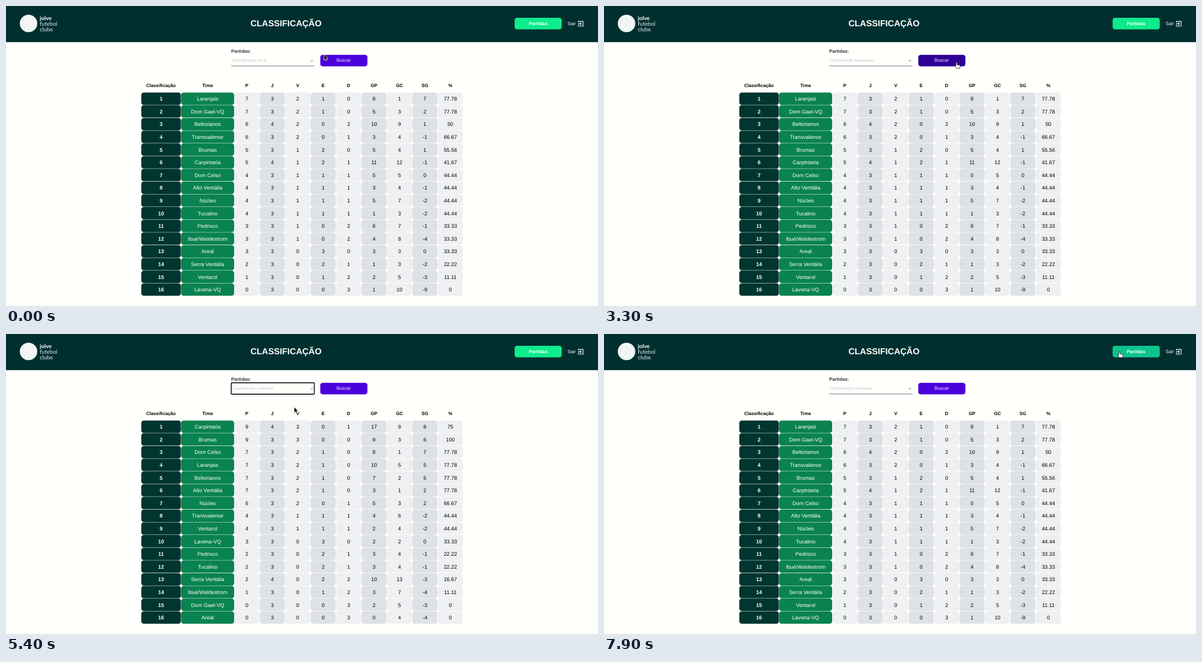
Write an HTML page that moves like this. It is 1051 px wide and 533 px high and loops after 8 s.

```html
<!DOCTYPE html>
<html lang="pt-BR">
<head>
<meta charset="utf-8">
<title>Classificação</title>
<style>
  html, body { margin: 0; width: 100%; height: 100%; overflow: hidden; background: #fffffc; }
  svg { display: block; width: 1051px; height: 533px; font-family: "Liberation Sans", Arial, sans-serif; font-size: 8.2px; text-rendering: geometricPrecision; }
  .mid { text-anchor: middle; }
  .bold { font-weight: bold; }
  .cell { font-size: 9.4px; text-anchor: middle; }
  .brand { font-family: Lato, sans-serif; font-size: 9.9px; }
  #popup { font-size: 7.4px; }
  #popup > rect:first-child { filter: drop-shadow(0 1.5px 1.5px #0005); }
</style>
</head>
<body>
<svg viewBox="0 0 1051 533">
  <rect width="1051" height="533" fill="#fffffc"/>
  <rect width="1051" height="64.2" fill="#012f30"/>
  <circle cx="40" cy="31" r="15.5" fill="#f1f5f5"/>
  <g class="brand" fill="#e3eaea">
    <text x="60" y="25" class="bold" fill="#fff">jolve</text>
    <text x="60" y="35">futebol</text>
    <text x="60" y="45">clube</text>
  </g>
  <text x="497" y="36.4" class="mid bold" font-size="15.35" fill="#fff">CLASSIFICAÇÃO</text>
  <rect id="matches" x="903" y="21.1" width="83.6" height="20.5" rx="4.2"/>
  <text x="944.7" y="34.2" class="mid bold" font-size="8.3" fill="#fff">Partidas</text>
  <text x="997" y="34.2" fill="#fff">Sair</text>
  <path d="M1016.2 29.6V27.4H1024.6V35.8H1016.2V33.6M1015.5 31.6H1021.4M1019.3 29.4L1021.5 31.6L1019.3 33.8" fill="none" stroke="#fff" stroke-width="1.1"/>

  <text x="399.7" y="83.3" class="bold" fill="#32323f">Partidas:</text>
  <path id="line" d="M399.7 106.5H547.5" stroke="#73737b"/>
  <text id="choice" x="401.7" y="99.4" font-size="7.1" fill="#c6c6cc"></text>
  <path d="M540.7 95.8L543 98.2L545.3 95.8" fill="none" stroke="#a5a5aa" stroke-width="1.1"/>
  <rect id="focus" x="399.8" y="86.6" width="147.6" height="20.3" rx="1.5" fill="none" stroke="#101018" stroke-width="1.6"/>
  <rect id="search" x="558" y="86.7" width="83.6" height="20.5" rx="4.2"/>
  <text x="599.6" y="99.4" class="mid" fill="#f4f0ff">Buscar</text>

  <g id="heads" class="mid bold" fill="#000"></g>
  <g id="cells"></g>
  <g id="tableA"></g>
  <g id="tableB"></g>

  <g id="popup">
    <rect x="400.2" y="107.2" width="147" height="29" fill="#fff" stroke="#77777c" stroke-width=".7"/>
    <path d="M399.8 106.8H547.6" stroke="#333"/>
    <rect id="mark" x="400.6" width="146.2" height="9.1" fill="#4169f0"/>
    <g id="options"></g>
  </g>
  <g id="cursor">
    <path id="arrow" d="M0 0V10.5L2.4 8.4L4 12L5.7 11.2L4.2 7.8H7.4Z" fill="#111" stroke="#fff" stroke-width=".7"/>
    <path id="hand" d="M-1.1 .8Q0 -.6 1.1 .8V4.2L5.3 5Q6.5 5.5 6.3 7L5.4 11H.2L-3.6 6.6Q-3.4 5.2 -1.1 6.6Z" fill="#fff" stroke="#111" stroke-width=".8"/>
  </g>
</svg>
<script>
const $ = id => document.getElementById(id);
const LOOP = 8000, STEP = 100;

// Each row: team, wins, draws, losses, goals for, goals against
const homeAndAway = `Laranjais,2,1,0,8,1
Dom Gael-VQ,2,1,0,5,3
Beltorianos,2,0,2,10,9
Transvalense,2,0,1,3,4
Brumas,1,2,0,5,4
Carpintaria,1,2,1,11,12
Dom Celso,1,1,1,5,5
Alto Ventália,1,1,1,3,4
Núcleo,1,1,1,5,7
Tucalino,1,1,1,1,3
Pedrisco,1,0,2,6,7
Ibué/Waldestrom,1,0,2,4,8
Areal,0,3,0,3,3
Serra Ventália,0,2,1,1,3
Ventarol,0,1,2,2,5
Lavena-VQ,0,0,3,1,10`;
const homeOnly = `Carpintaria,3,0,1,17,9
Brumas,3,0,0,9,3
Dom Celso,2,1,0,8,1
Laranjais,2,1,0,10,5
Beltorianos,2,1,0,7,2
Alto Ventália,2,1,0,3,1
Núcleo,2,0,1,5,3
Transvalense,1,1,1,4,6
Ventarol,1,1,1,2,4
Lavena-VQ,0,3,0,2,2
Pedrisco,0,2,1,3,4
Tucalino,0,2,1,3,4
Serra Ventália,0,2,2,10,13
Ibué/Waldestrom,0,1,2,3,7
Dom Gael-VQ,0,0,3,2,5
Areal,0,0,3,0,4`;

const text = (x, y, s, attrs = '') => `<text x="${x}" y="${y}" ${attrs}>${s}</text>`;
const rect = (x, y, w, fill) => `<rect x="${x}" y="${y}" width="${w}" height="22.05" rx="4.4" fill="${fill}"/>`;
const colX = i => 427.6 + 45.16 * i;
const rowY = i => 153.7 + 22.6 * i;
const BASELINE = 14.5;

function tableRows(data) {
  return data.split('\n').map((line, r) => {
    const [team, ...nums] = line.split(',');
    const [v, e, d, gp, gc] = nums.map(Number);
    const p = 3 * v + e, j = v + e + d, y = rowY(r) + BASELINE;
    const stats = [p, j, v, e, d, gp, gc, gp - gc, +(p / j / 3 * 100).toFixed(2)];
    return text(358, y, team, 'class="cell" fill="#fff"') +
      stats.map((n, c) => text(colX(c), y, n, 'class="cell" fill="#000"')).join('');
  }).join('');
}

$('heads').innerHTML = text(275.2, 143.6, 'Classificação') + text(358, 143.6, 'Time') +
  ['P', 'J', 'V', 'E', 'D', 'GP', 'GC', 'SG', '%'].map((h, i) => text(colX(i), 143.6, h)).join('');

let cells = '';
for (let r = 0; r < 16; r++) {
  const y = rowY(r);
  cells += rect(240.2, y, 70.3, '#003530') + rect(311, y, 94, '#0a8350') +
    text(275.3, y + BASELINE, r + 1, 'class="cell bold" fill="#fff"');
  for (let c = 0; c < 9; c++) cells += rect(colX(c) - 22.3, y, 44.6, c % 2 ? '#dee1e6' : '#eff0f1');
}
$('cells').innerHTML = cells;
$('tableA').innerHTML = tableRows(homeAndAway);
$('tableB').innerHTML = tableRows(homeOnly);

const choices = ['Geral', 'Mandantes', 'Visitantes'].map(s => 'Classificação ' + s);
$('options').innerHTML = choices.map((s, i) => text(402.3, 114.8 + 9.3 * i, s)).join('');

// Pointer moves: start, end, x, y
const moves = [
  [200, 800, 520, 95],
  [1500, 1800, 512, 119.5],
  [2500, 2900, 633, 98],
  [3000, 3300, 626, 100],
  [3800, 4200, 532, 99.3],
  [4500, 5100, 511.5, 129.5],
  [5500, 6100, 600, 96.5],
  [6900, 7800, 918, 31],
  [7800, 7900, 915, 31]
];

function pointer(t) {
  let x = 564.5, y = 85.6;
  for (const [start, end, toX, toY] of moves) {
    const k = Math.min(1, Math.max(0, (t - start) / (end - start)));
    const s = k * k * (3 - 2 * k);
    x += (toX - x) * s;
    y += (toY - y) * s;
  }
  return [x, y];
}

const show = (id, on) => $(id).setAttribute('visibility', on ? 'visible' : 'hidden');
const within = (t, a, b) => t >= a && t < b;

function draw(now) {
  const t = Math.floor(now % LOOP / STEP) * STEP;
  const [x, y] = pointer(t);
  const onSearch = within(x, 558, 641.6) && within(y, 86.7, 107.2);
  const onMatches = within(x, 903, 986.6) && within(y, 21.1, 41.6);
  const open = within(t, 1400, 2400) || within(t, 4300, 5400);
  const focused = within(t, 2400, 3100) || within(t, 5400, 6300);
  const chosen = t < 2400 ? 0 : t < 5400 ? 1 : 2;
  const lit = y > 108 ? Math.min(2, Math.floor((y - 108) / 9.3)) : chosen;
  const second = within(t, 3700, 6700);

  $('choice').textContent = choices[chosen];
  $('choice').setAttribute('x', focused ? 401.2 : 401.7);
  show('focus', focused);
  show('line', !focused && !open);
  show('popup', open);
  $('mark').setAttribute('y', 117.3 + 9.3 * (lit - 1));
  [...$('options').children].forEach((o, i) => o.setAttribute('fill', i === lit ? '#eef1ff' : '#c6c6cc'));
  $('search').setAttribute('fill', onSearch ? '#2e0096' : '#4b00dc');
  $('matches').setAttribute('fill', onMatches ? '#0dc48c' : '#0eeb8b');
  show('tableA', !second);
  show('tableB', second);
  show('hand', onSearch || onMatches);
  show('arrow', !onSearch && !onMatches);
  $('cursor').setAttribute('transform', `translate(${x} ${y})`);
}

const begin = performance.now();
function tick() {
  draw(performance.now() - begin);
  requestAnimationFrame(tick);
}
tick();
</script>
</body>
</html>
```
